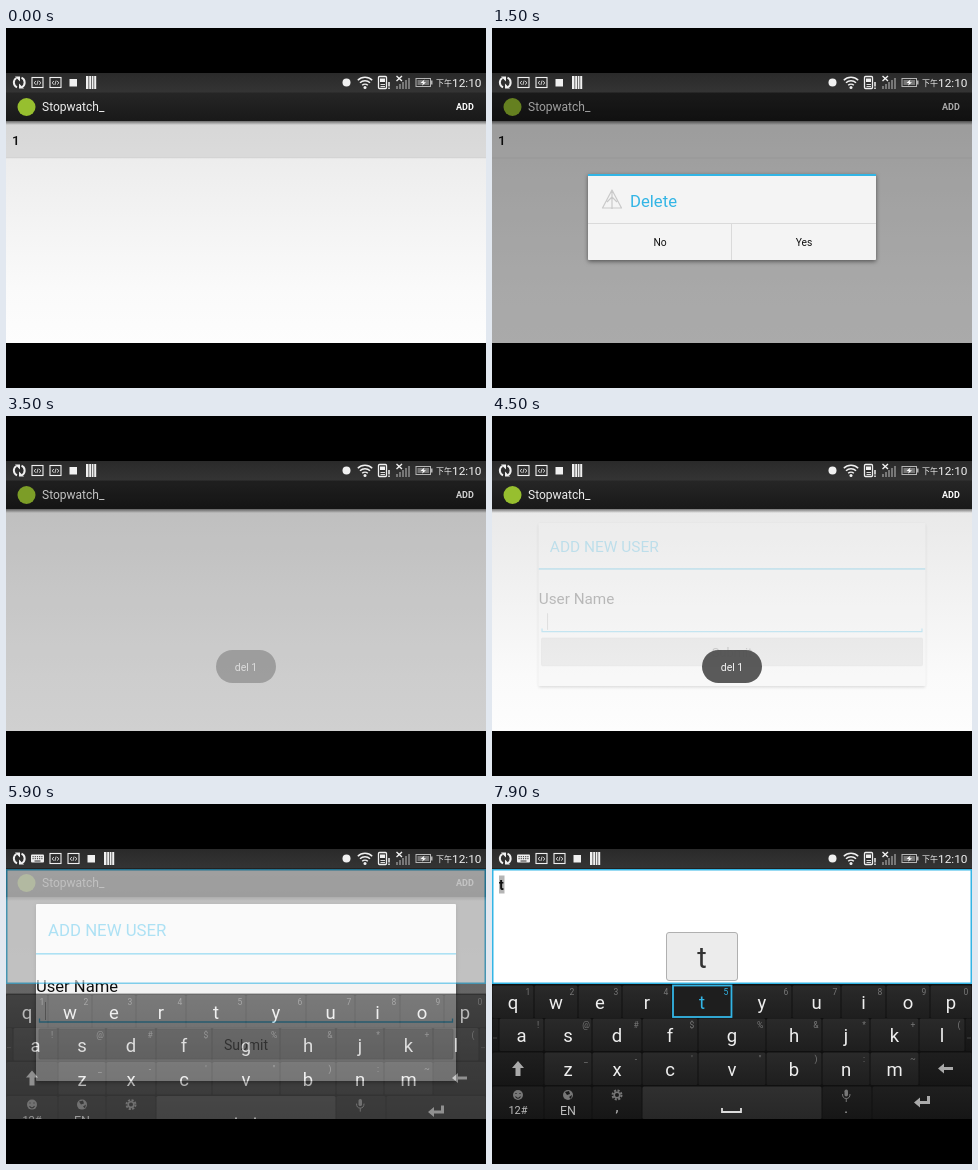
Recreate the animation shown at these times as an HTML page. Size 480 by 360 pixels, loop 8000 ms.

```html
<!DOCTYPE html>
<html lang="en">
<head>
<meta charset="utf-8">
<title>Stopwatch list</title>
<style>
  html, body { margin: 0; width: 100%; height: 100%; overflow: hidden; background: #000; }
  svg { display: block; width: 100vw; height: 100vh; font-family: Roboto, "Noto Sans CJK SC", "Noto Sans CJK JP", sans-serif; }
</style>
</head>
<body>
<svg id="stage" viewBox="0 0 480 360">
  <defs>
    <linearGradient id="page" x2="0" y2="1"><stop stop-color="#e9e9e9"/><stop offset=".75" stop-color="#fafafa"/><stop offset="1" stop-color="#fdfdfd"/></linearGradient>
    <linearGradient id="status" x2="0" y2="1"><stop stop-color="#2a2a2a"/><stop offset="1" stop-color="#343434"/></linearGradient>
    <linearGradient id="bar" x2="0" y2="1"><stop stop-color="#262626"/><stop offset="1" stop-color="#191919"/></linearGradient>
    <linearGradient id="shade" x2="0" y2="1"><stop stop-opacity=".5"/><stop offset="1" stop-opacity="0"/></linearGradient>
    <linearGradient id="key" x2="0" y2="1"><stop stop-color="#2a2a2a"/><stop offset="1" stop-color="#1e1e1e"/></linearGradient>
    <linearGradient id="fn" x2="0" y2="1"><stop stop-color="#1f1f1f"/><stop offset="1" stop-color="#161616"/></linearGradient>
    <linearGradient id="space" x2="0" y2="1"><stop stop-color="#303030"/><stop offset="1" stop-color="#272727"/></linearGradient>
    <filter id="drop" x="-10%" y="-10%" width="120%" height="130%">
      <feDropShadow dx="0" dy="1.5" stdDeviation="2" flood-opacity=".5"/>
    </filter>
    <clipPath id="screen"><rect y="64" width="480" height="251"/></clipPath>
  </defs>
</svg>
<script>
const LOOP = 8000, STEP = 100, BLUE = '#33b5e5';
const stage = document.getElementById('stage');

function add(parent, tag, attrs = {}) {
  const el = document.createElementNS('http://www.w3.org/2000/svg', tag);
  for (const k in attrs) el.setAttribute(k, attrs[k]);
  return parent.appendChild(el);
}
const group = (p, attrs) => add(p, 'g', attrs);
const rect = (p, x, y, width, height, fill, more) => add(p, 'rect', { x, y, width, height, fill, ...more });
const line = (p, d, stroke, width = 1, more) =>
  add(p, 'path', { d, stroke, 'stroke-width': width, fill: 'none', ...more });
const shape = (p, d, fill, more) => add(p, 'path', { d, fill, ...more });
const dot = (p, cx, cy, r, fill) => add(p, 'circle', { cx, cy, r, fill });
function text(p, x, y, str, size, fill, anchor = 'start', weight = 400) {
  const el = add(p, 'text', { x, y, fill, 'font-size': size, 'text-anchor': anchor, 'font-weight': weight });
  el.textContent = str;
  return el;
}

// List screen
const app = group(stage, { 'clip-path': 'url(#screen)' });
rect(app, 0, 93, 480, 222, 'url(#page)');
const row = group(app);
const press = rect(row, 0, 93, 480, 37, '#000');
rect(row, 0, 129.500, 480, 1, '#000', { opacity: .06 });
text(row, 6, 117.200, '1', 13.500, '#111', 'start', 500);
rect(app, 0, 93, 480, 4, 'url(#shade)');
rect(app, 0, 64, 480, 29, 'url(#bar)');
const addPress = rect(app, 437, 65, 43, 28, '#fff', { opacity: .2 });
dot(app, 20.5, 79, 9, '#97bf2f');
text(app, 36, 83.4, 'Stopwatch_', 12, '#eee');
text(app, 450, 82, 'ADD', 9, '#fff', 'start', 700);
const dim = rect(app, 0, 64, 480, 251, '#000');

// Delete dialog
const del = group(stage, { filter: 'url(#drop)' });
rect(del, 96, 146, 288, 86, '#f4f4f4', { rx: 1 });
rect(del, 96, 146, 288, 2, BLUE);
line(del, 'M120 162L129.500 180H110.500ZM120 163V181M115 174L120 169L125 174', '#c9c9c9', 1.2, { 'stroke-linejoin': 'round' });
text(del, 138, 178.500, 'Delete', 16.700, BLUE);
const yesPress = rect(del, 240, 195.500, 144, 36.500, '#dedede');
line(del, 'M96 195.500H384M239.500 196V232', '#dadada');
text(del, 168, 218, 'No', 10.300, '#111', 'middle');
text(del, 312, 218, 'Yes', 10.300, '#111', 'middle');

// New user dialog
const form = group(stage, { filter: 'url(#drop)' });
rect(form, 30, 100, 420, 177, '#f3f3f3', { rx: 1 });
text(form, 42, 131.500, 'ADD NEW USER', 16.800, BLUE);
rect(form, 30, 149, 420, 1.600, BLUE);
text(form, 30, 188, 'User Name', 16.600, '#111');
line(form, 'M39.500 198V216', '#999');
line(form, 'M33.500 214.500V218H446.500V214.500', BLUE, 1.300);
rect(form, 33, 225, 414, 30, '#c6c6c6', { rx: 1, stroke: '#b4b4b4', 'stroke-width': .8 });
text(form, 240, 246, 'Submit', 14, '#444', 'middle');

// Keyboard with full-width editor
const ime = group(group(stage, { 'clip-path': 'url(#screen)' }));
rect(ime, 0, 65, 480, 115, '#fff');
rect(ime, .75, 65.750, 478.500, 113.500, 'none', { stroke: BLUE, 'stroke-width': 1.500 });
const caret = rect(ime, 7, 72, 1, 17, '#444');
const typed = group(ime);
rect(typed, 7, 71.500, 5.500, 18, '#b5b5b5');
text(typed, 7, 86, 't', 14, '#111', 'start', 700);

const keys = group(ime);
rect(keys, 0, 180, 480, 135, '#101010');
const face = (x, end, y, fill) => rect(keys, x + .5, y + .5, end - x - 1, 32.500, fill, { rx: 1.500 });
const inner = [52, 100, 150, 206, 274, 330, 378, 427];
const rows = [
  { y: 181, letters: 'qwertyuiop', hints: '1234567890', edges: [0, 42, 86, 130, 180, 240, 300, 349, 394, 438, 480] },
  { y: 214, letters: 'asdfghjkl', hints: '!@#$%&*+(', edges: [7, ...inner, 473] },
  { y: 248, letters: 'zxcvbnm', hints: '_-\'"):~', edges: inner }
];
for (const { y, letters, hints, edges } of rows) {
  [...letters].forEach((c, i) => {
    face(edges[i], edges[i + 1], y, 'url(#key)');
    text(keys, (edges[i] + edges[i + 1]) / 2, y + 24, c, 18.500, '#eee', 'middle');
    text(keys, edges[i + 1] - 6, y + 10, hints[i], 8.500, '#777', 'middle');
  });
}
face(0, 7, 214, 'url(#fn)');
face(473, 480, 214, 'url(#fn)');
for (const x of [2, 4, 476, 478]) dot(keys, x, 234, .7, '#555');
face(0, 52, 248, 'url(#fn)');
face(427, 480, 248, 'url(#fn)');
shape(keys, 'M26 257L32 264H28.500V272H23.500V264H20Z', '#aaa');
shape(keys, 'M446 264.500L452 259.500V263H461V266H452V269.500Z', '#aaa');
for (const [a, b] of [[0, 52], [52, 100], [100, 150], [330, 380], [380, 480]]) face(a, b, 282, 'url(#fn)');
face(150, 330, 282, 'url(#space)');
text(keys, 26, 310, '12#', 11, '#bbb', 'middle');
text(keys, 76, 311, 'EN', 12.500, '#bbb', 'middle');
text(keys, 125, 308, ',', 15, '#bbb', 'middle');
text(keys, 354, 309, '.', 14, '#bbb', 'middle');
line(keys, 'M230 304V308H249V304', '#ddd', 1.800);
shape(keys, 'M422 298.500L428 293.500V297H435V292H438V300H428V303.500Z', '#aaa');
// smiley, globe, gear, microphone
dot(keys, 26, 291, 5, '#777');
line(keys, 'M23.500 292.500Q26 296 28.500 292.500M24 289V290M28 289V290', '#1a1a1a', 1.100);
dot(keys, 76, 291, 5, '#777');
shape(keys, 'M73 288L77 287L78 290L75 291ZM77 293L80 291L79 295Z', '#1a1a1a');
add(keys, 'circle', { cx: 125, cy: 291, r: 4.500, fill: 'none', stroke: '#777', 'stroke-width': 2, 'stroke-dasharray': '2.100 1.434' });
add(keys, 'circle', { cx: 125, cy: 291, r: 2.800, fill: 'none', stroke: '#777', 'stroke-width': 1.600 });
rect(keys, 352.500, 285.500, 3.500, 7, '#777', { rx: 1.700 });
line(keys, 'M350.500 290Q350.500 294.500 354.250 294.500T358 290M354.250 294.500V298', '#777');

const hit = group(ime);
rect(hit, 181, 181.500, 58.500, 31.500, '#1e1e1e', { stroke: BLUE, 'stroke-width': 1.800 });
text(hit, 210, 205, 't', 18.500, BLUE, 'middle');
text(hit, 234, 191, '5', 8.500, BLUE, 'middle');
rect(hit, 174.500, 128.500, 71, 48, '#ececec', { rx: 2.500, stroke: '#b0b0b0' });
text(hit, 210, 164, 't', 29, '#333', 'middle');

// Toast
const toast = group(stage);
rect(toast, 210, 234, 60, 33, '#525252', { rx: 16.500, opacity: .95 });
text(toast, 240, 255, 'del 1', 10.500, '#f4f4f4', 'middle');

// Status bar
const bar = group(stage);
rect(bar, 0, 0, 480, 45, '#000');
rect(bar, 0, 45, 480, 19.500, 'url(#status)');
const W = '#f0f0f0';
line(bar, 'M11 59.300A5.200 5.200 0 0 1 10.500 50M15.500 49.700A5.200 5.200 0 0 1 16 59', W, 2);
shape(bar, 'M9 48.500H14V53.500ZM18 60.500H13V55.500Z', W);
const kbIcon = group(bar);
rect(kbIcon, 25, 50.500, 13, 8, W, { rx: 1 });
line(kbIcon, 'M26.500 52.700H36.500M26.500 54.700H36.500', '#2e2e2e', 1, { 'stroke-dasharray': '1.200 1' });
line(kbIcon, 'M28.500 57H34.500', '#2e2e2e');
const notes = group(bar);
for (const x of [31.500, 49.500]) {
  rect(notes, x - 5.500, 49.500, 11, 10, 'none', { stroke: W, 'stroke-width': 1.100 });
  line(notes, `M${x - 1.500} 53L${x - 3.500} 54.800L${x - 1.500} 56.600M${x + 1.500} 53L${x + 3.500} 54.800L${x + 1.500} 56.600M${x + .6} 52.500L${x - .6} 57`, W, .8);
}
rect(notes, 63.500, 51, 7.500, 7.500, W);
for (const [x, w] of [[80, 2.500], [83.200, 1.800], [85.700, 1.800], [88.200, 2]]) rect(notes, x, 48, w, 13, W);

dot(bar, 340.500, 54.500, 4, W);
dot(bar, 359, 59.500, 1.500, W);
line(bar, 'M356.200 57.300A4 4 0 0 1 361.800 57.300M354 54.800A7 7 0 0 1 364 54.800M351.800 52.300A10 10 0 0 1 366.200 52.300', W, 1.500);
rect(bar, 372.500, 48.500, 8, 12, 'none', { stroke: W, 'stroke-width': 1.300, rx: 1 });
rect(bar, 374, 50.500, 5, 3.500, W);
line(bar, 'M374.500 56.500H379M374.500 58.500H379', W, .9);
line(bar, 'M383 54V58.500M383 59.500V61', W, 1.500);
line(bar, 'M390.500 48L396 53M396 48L390.500 53', W, 1.400);
[3, 5, 7, 9, 11].forEach((h, i) => rect(bar, 390 + i * 3, 61 - h, 2, h, '#777'));
rect(bar, 410, 50.500, 14.500, 8, 'none', { stroke: '#b5b5b5', 'stroke-width': 1 });
rect(bar, 411.500, 52, 11.500, 5, '#777');
rect(bar, 425, 52.500, 1.500, 4, '#b5b5b5');
shape(bar, 'M418.500 51.500L414.500 55H417L416 57.800L420 54.200H417.500Z', '#fff');
text(bar, 430, 58.200, '下午', 8, W);
text(bar, 475.500, 59, '12:10', 11.800, W, 'end');

rect(stage, 0, 315, 480, 45, '#000');

// Tracks of [ms, value], linear in between
const tracks = {
  press: [[400, .08], [1200, 0]],
  dim: [[1200, 0], [1300, .08], [1700, .58], [2800, .58], [2900, .54], [3100, .54], [3300, .35], [3500, .18], [3700, .07],
    [4000, 0], [4500, 0], [5300, .58]],
  delFade: [[1100, 0], [1200, .35], [1300, .74], [1500, 1], [3100, 1], [3400, 0]],
  delScale: [[1100, .9], [1300, .958], [1500, 1], [3100, 1], [3400, .93]],
  formFade: [[4400, 0], [4800, 1], [6200, 1], [6300, 0]],
  formScale: [[4400, .9], [4900, 1]],
  toast: [[3300, 0], [3500, .4], [3800, 1], [5400, 1], [5800, 0]],
  ime: [[5600, 0], [6100, 1]],
  hit: [[6900, 0], [7200, 1]]
};
function at(name, t) {
  const tr = tracks[name];
  if (t <= tr[0][0]) return tr[0][1];
  for (let i = 1; i < tr.length; i++) {
    const [a, u] = tr[i - 1], [b, v] = tr[i];
    if (t <= b) return u + (v - u) * (t - a) / (b - a);
  }
  return tr[tr.length - 1][1];
}

function fade(el, v) {
  el.style.opacity = v;
  el.style.display = v > 0 ? '' : 'none';
}
const show = (el, on) => { el.style.display = on ? '' : 'none'; };
const zoom = (el, s) => el.setAttribute('transform', `translate(240 189) scale(${s}) translate(-240 -189)`);

function draw(t) {
  fade(press, at('press', t));
  show(row, t < 2900);
  show(addPress, t >= 4100 && t < 4500);
  fade(dim, at('dim', t));
  fade(del, at('delFade', t));
  zoom(del, at('delScale', t));
  show(yesPress, t >= 2500 && t < 2900);
  fade(form, at('formFade', t));
  zoom(form, at('formScale', t));
  fade(toast, at('toast', t));
  const up = at('ime', t);
  fade(ime, up);
  keys.setAttribute('transform', `translate(0 ${60 * (1 - up) ** 2})`);
  show(caret, (t >= 6300 && t < 6400) || (t >= 6700 && t < 7900));
  fade(hit, at('hit', t));
  show(typed, t >= 7900);
  show(kbIcon, t >= 5900);
  notes.setAttribute('transform', `translate(${t >= 5900 ? 18 : 0} 0)`);
}

const start = performance.now();
function tick() {
  const t = (performance.now() - start) % LOOP;
  draw(Math.floor(t / STEP) * STEP);
  requestAnimationFrame(tick);
}
tick();
</script>
</body>
</html>
```
